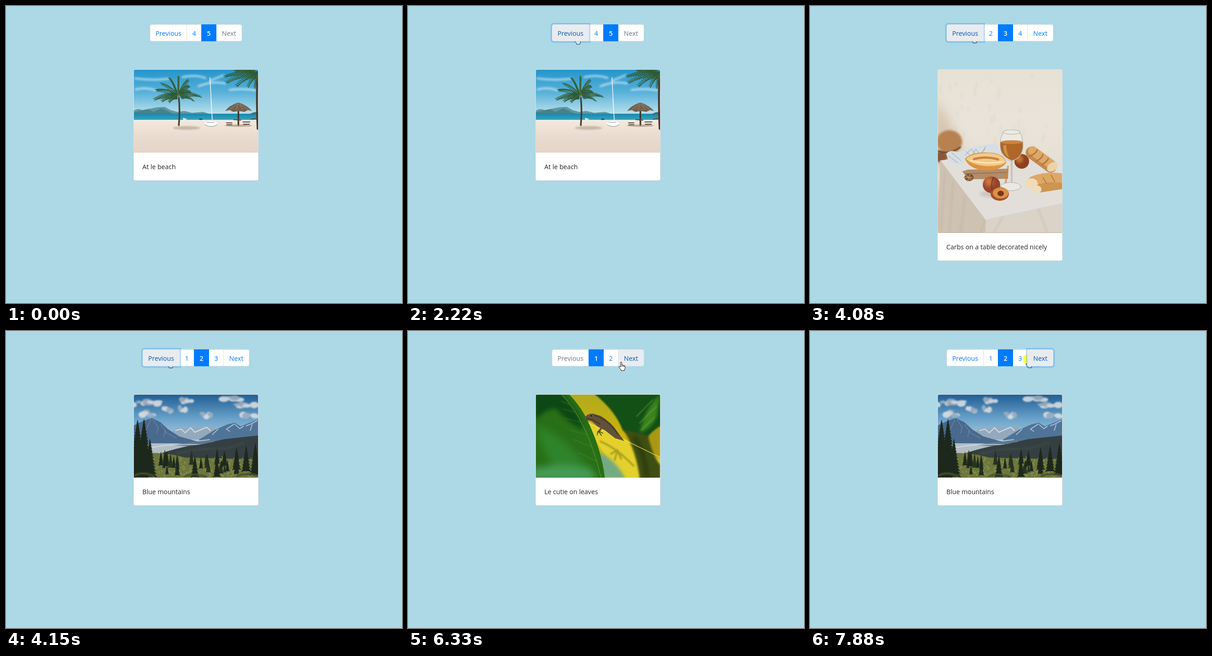
Recreate the animation shown at these times as an HTML page. Size 864x648 px, loop 8 s.

```html
<!DOCTYPE html>
<html lang="en">
<head>
<meta charset="utf-8">
<title>Photo pages</title>
<style>
html, body { margin: 0; width: 100%; height: 100%; overflow: hidden; background: #add8e6; }
body { font: 14.2px "Open Sans", "Noto Sans", sans-serif; color: #212529; }
#pager { position: absolute; top: 40px; display: flex; }
#pager span {
  box-sizing: border-box; width: 33px; height: 37px; margin-left: -1px; position: relative;
  border: 1px solid #dee2e6; background: #fff; color: #007bff; line-height: 37px; text-align: center;
}
#pager span:first-child { width: 81px; margin-left: 0; border-radius: 4px 0 0 4px; }
#pager span:last-child { width: 57px; border-radius: 0 4px 4px 0; }
#pager .hover { background: #e9ecef; color: #0056b3; }
#pager .off { color: #6c757d; }
#pager .active { background: #007bff; border-color: #007bff; color: #fff; font-weight: 600; z-index: 1; }
#pager .focus { z-index: 2; box-shadow: 0 0 0 3px rgba(0, 123, 255, .25); }
#card {
  position: absolute; left: 278px; top: 138px; width: 271px; overflow: hidden;
  border: 1px solid rgba(0, 0, 0, .125); border-radius: 4px; background: #fff;
}
#photo { display: block; }
#caption { position: absolute; left: 297.5px; line-height: 22px; white-space: nowrap; }
#pointer { position: absolute; left: 0; top: 0; }
#glow { mix-blend-mode: multiply; }
</style>
</head>
<body>
<div id="pager"></div>
<div id="card"><svg id="photo" width="271"></svg></div>
<div id="caption"></div>
<svg id="glowLayer" width="864" height="648" style="position:absolute;left:0;top:0;mix-blend-mode:multiply">
  <circle id="glow" r="11.5" fill="#ffff45"/>
</svg>
<svg id="pointer" width="864" height="648" fill="#fff" stroke="#111" stroke-linejoin="round">
  <path id="arrow" d="M0 0V13L3 10.3 5.1 15 7.1 14.1 5.1 9.6H9Z"/>
  <path id="hand" d="M-1.4 11V1.2Q-1.4 -.4 0 -.4T1.4 1.2V6.2Q3.5 5 4 6.8Q6 6 6.4 7.6Q8.6 7.2 8.6 9.5V12.5Q8.6 14.5 7.2 16V18.2H-.2V16.6L-4.8 11.2Q-5.4 9.2 -3.4 9.2ZM1.4 6.2v4M4 6.8v3.4M6.4 7.6v3"/>
</svg>
<script>
const $ = id => document.getElementById(id);

// Drawing helpers
const soft = n => `style="filter:blur(${n}px)"`;
const fill = (color, d, more = '') => `<path fill="${color}" d="${d}" ${more}/>`;
const line = (color, w, d, more = '') =>
  `<path fill="none" stroke="${color}" stroke-width="${w}" stroke-linecap="round" d="${d}" ${more}/>`;
const oval = (color, x, y, rx, ry = rx, more = '') =>
  `<ellipse fill="${color}" cx="${x}" cy="${y}" rx="${rx}" ry="${ry}" ${more}/>`;
const fade = (y, h, ...colors) => {
  const id = 'fade' + y;
  const stops = colors.map((c, i) => `<stop offset="${i / (colors.length - 1)}" stop-color="${c}"/>`).join('');
  return `<linearGradient id="${id}" x2="0" y2="1">${stops}</linearGradient>
    <rect x="270" y="${y}" width="290" height="${h}" fill="url(#${id})"/>`;
};
const each = (list, fn) => list.map(v => fn(...v)).join('');
const random = seed => () => {
  seed = (seed * 16807) % 2147483647;
  return seed / 2147483647;
};

function frond(x, y, ex, ey) {
  const cx = (x + ex) / 2, cy = (y + ey) / 2 - 9, dx = (ex - x) * .12;
  let d = '';
  for (let t = .1; t < 1; t += .07) {
    const u = 1 - t;
    const px = u * u * x + 2 * u * t * cx + t * t * ex;
    const py = u * u * y + 2 * u * t * cy + t * t * ey;
    d += `M${px} ${py}l${dx + 1} ${8 * u + 2}M${px} ${py}l${dx - 2} ${-4 * u - 1}`;
  }
  return line('#2d5836', 1.4, d) + line('#456c3c', 1.5, `M${x} ${y}Q${cx} ${cy} ${ex} ${ey}`);
}

function tree(x, base, h, color = '#1d281c') {
  const n = Math.max(5, Math.round(h / 7));
  let right = '', left = '';
  for (let i = 1; i <= n; i++) {
    const w = h * .19 * i / n + 1, y = base - h + h * i / n;
    right += `L${x + w} ${y}L${x + w * .6} ${y - 1}`;
    left = `L${x - w * .6} ${y - 1}L${x - w} ${y + 1}` + left;
  }
  return fill(color, `M${x} ${base - h - 3}${right}${left}Z`);
}

function camera(x, y, size, top, turn = -8, blur = 0.3) {
  return `<g transform="translate(${x} ${y}) rotate(${turn}) scale(${size})" ${soft(blur)}>`
    + fill('#0b0c0e', 'M-51 -4H51V38Q50 43 45 43H-45Q-51 42 -51 36Z')
    + fill(top, 'M-51 0V-14H-23L-12 -32H14L25 -14H51V0Z')
    + fill('#fff', 'M-11 -30H13L18 -22H-16Z', 'opacity=".25"')
    + fill('#111', 'M-19 -4L-8 -20H10L21 -4Z', 'opacity=".3"')
    + oval('#202326', -37, -15, 10, 6) + oval(top, -37, -18, 9, 4)
    + oval('#202326', 37, -15, 9, 6) + oval('#d6d9db', 37, -18, 7, 3)
    + '<g stroke="#63676b" stroke-width="2">' + oval('#08090a', 0, 26, 26, 24) + '</g>'
    + '<g stroke="#aeb1b4" stroke-width="3">' + oval('#15181b', 0, 30, 17, 15) + '</g>'
    + oval('#34393f', -4, 27, 6, 5) + '</g>';
}

function beach() {
  return fade(139, 98, '#2595cb', '#57b1da', '#bfe2ec')
    + line('#f2fafb', 4, 'M282 158q35 5 72 1M283 182q20 -6 44 2M385 155q28 -6 50 2M420 175q30 -12 58 -6M488 183q30 -4 56 1M445 163l30 -12', 'opacity=".65" ' + soft(2))
    + fill('#5c98a3', 'M278 236V229Q287 222 298 227L330 221 346 220 359 227 373 231 389 229 406 233 430 231 449 237Z')
    + fill('#3e7a7c', 'M278 237V232L310 225 322 231 339 223 360 233 376 237Z', 'opacity=".7"')
    + fade(235, 16, '#1e86ab', '#36abc0')
    + fill('#397180', 'M530 237Q540 230 551 231V237Z')
    + fade(249, 72, '#f4e8dc', '#e9dbcf', '#e5d4c7')
    + line('#f9f5ee', 2, 'M278 249.5H551')
    + oval('#ad9680', 394, 266, 30, 4, 'opacity=".55" ' + soft(1.5))
    + line('#4b3b31', 3.5, 'M377 200Q380 228 377 260')
    + each([[326, 205], [330, 184], [341, 169], [358, 157], [377, 153], [397, 160], [399, 174], [402, 187], [423, 198],
      [408, 207], [342, 209], [357, 211]], (x, y) => frond(376, 194, x, y))
    + line('#eef4f5', 1.6, 'M445 156L450 250M447 203l3 44')
    + oval('#fff', 447, 257, 14, 6) + line('#7d8a8b', 1, 'M434 259q13 8 27 0M438 254h16')
    + line('#43362b', 3.5, 'M507 228V260')
    + oval('#8b7663', 507, 261, 30, 2.5, 'opacity=".5"')
    + fill('#736252', 'M478 229Q487 217 505 211H509Q526 217 537 229L528 227 520 231 508 229 496 231 488 227Z')
    + line('#a28c75', 1, 'M505 213l-16 13M507 213l-5 14M509 213l8 14M511 214l17 12')
    + line('#5d4c3e', 2, 'M481 255h12M482 259h11M517 253l15 0M518 258h13M497 248l15 1M535 247l13 -2')
    + fill('#f3f5f3', 'M386 244l10 3 -9 2Z') + oval('#344f55', 425, 247, 4, 1.5)
    + line('#46352b', 4, 'M549 145Q546 200 549 268')
    + each([[481, 155], [484, 168], [505, 176], [502, 143], [529, 178], [520, 141], [543, 180], [551, 176]],
      (x, y) => frond(549, 146, x, y));
}

function cameras() {
  return fade(139, 340, '#090a0b', '#15171a', '#08090a')
    + fill('#a77f69', 'M278 222L292 232 288 254 278 248ZM398 246l16 10 -12 8ZM480 330l18 12 -15 10ZM430 432l12 -10 4 28 -12 12Z', soft(1.5))
    + each([[370, 160, .65, '#838b90', -5, 1.4], [294, 167, .55, '#8d9497', -12, 1.2], [424, 180, .57, '#9ca2a3', 0, 1],
      [510, 170, .65, '#292c2f', -15, 1], [340, 204, .9, '#a1a6a6', -8, .8], [433, 211, .75, '#989d9f', -4, .6],
      [534, 207, .65, '#a8aaa9', -12, .7], [488, 242, .6, '#222528', -5, .8], [378, 247, .7, '#b5b9b8', -9, .3],
      [291, 269, .7, '#25292c', -5], [515, 282, .8, '#303438', -12], [417, 278, .98, '#bfc3c2', -8, .1],
      [321, 325, .88, '#b9bfc3', 5, .2], [527, 342, .68, '#292d31', -16],
      [435, 330, 1.15, '#c2c6c5', -12, .1], [310, 380, .65, '#292c2e', -10, .6],
      [502, 397, 1.15, '#24282b', -14, .8], [378, 421, 1.25, '#303437', -5, 1]], camera)
    + fill('#bfc4c4', 'M294 426Q303 410 326 409L363 415 361 433 298 438Z', soft(1.5))
    + oval('#e2e4e2', 350, 393, 12, 9, soft(1)) + oval('#d7dad9', 424, 399, 14, 11, soft(1.5))
    + oval('#eceeec', 465, 381, 24, 12, 'transform="rotate(-18 465 381)" ' + soft(1.5))
    + line('#9a9d9c', 7, 'M428 353Q438 378 464 378M510 430q5 15 30 5M304 354q18 -18 40 -5', soft(.8))
    + fill('#d9dcda', 'M440 478Q460 451 488 459L514 449 520 461 551 446V478Z', soft(2))
    + line('#737a7e', 3, 'M460 170l12 -28M486 165l15 -24', 'stroke-dasharray="2 5"');
}

function table() {
  const next = random(9);
  let marks = '';
  for (let i = 0; i < 28; i++) marks += `M${285 + next() * 260} ${145 + next() * 150}v${3 + next() * 18}`;
  return fade(139, 356, '#e7e1d5', '#e9e4da', '#e5ddd0', '#bda48d')
    + fill('#d6c4ae', 'M270 200Q320 265 340 350H270Z', soft(12))
    + line('#bdb09e', 2, marks, 'opacity=".25" ' + soft(2))
    + oval('#b88152', 304, 296, 28, 25, soft(2)) + oval('#8a5836', 285, 329, 16, 12, soft(2))
    + line('#65452f', 3, 'M279 316Q305 326 328 308', soft(1))
    + fill('#e2dfdb', 'M284 337L410 320 551 333V432L383 468Z', soft(.6))
    + fill('#cec2b3', 'M284 336L383 466V494H279Z')
    + fill('#dbd3c8', 'M383 466L551 430V494H383Z')
    + line('#b7a898', 2, 'M294 360L286 490M312 384L304 494M338 415l-9 79M382 468l-10 26M420 460l-18 34M498 444l20 50', 'opacity=".55" ' + soft(2))
    + fill('#d8dee2', 'M297 323Q304 312 322 319L360 306 407 299 416 320 380 334 345 330 330 348 303 340Z', soft(.7))
    + line('#919ca5', 1, 'M340 317l12 11 10 -16 10 15 11 -20M338 326l14 -14 14 17 16 -17M302 327l20 15M309 320l20 17')
    + fill('#b28d69', 'M332 361L344 357 433 355 432 377 346 378Z') + line('#806044', 1, 'M338 366L432 363')
    + oval('#77502e', 347, 374, 10, 8) + line('#bd8d55', 2, 'M339 368l14 12M349 367l-5 15M336 374h18')
    + fill('#dc9440', 'M338 333Q354 317 393 320 421 321 429 341 417 359 383 359 346 356 338 333Z')
    + fill('#f4ca88', 'M340 333Q356 320 390 321 420 322 428 341 412 351 382 349 351 346 340 333Z')
    + line('#c98340', 5, 'M358 334Q385 327 411 335', 'stroke-dasharray="4 3"')
    + line('#fff0c9', 2, 'M350 337Q382 346 421 340')
    + oval('#8c421f', 462, 339, 16) + oval('#cb7937', 457, 334, 8, 8, soft(3))
    + line('#c38a4f', 27, 'M484 320L525 350') + line('#dda968', 20, 'M486 316L526 345')
    + line('#b6763c', 3, 'M481 327q12 -5 15 -13M494 338q12 -5 14 -14M506 346q10 -5 14 -13')
    + oval('#ecd3a7', 529, 351, 13, 9, 'transform="rotate(-35 529 351)"')
    + line('#cd9452', 20, 'M500 397L553 389') + line('#dda866', 21, 'M486 382Q520 369 556 377')
    + oval('#f0dcb8', 483, 388, 14, 12) + oval('#f1ddbc', 497, 400, 8, 8)
    + line('#b97a40', 2, 'M508 374l8 13M526 369l8 14')
    + oval('#edf1ed', 440, 303, 26, 35, 'opacity=".45"')
    + fill('#ae6629', 'M415 297H464Q467 329 440 337 413 327 415 297Z') + oval('#cc8540', 440, 297, 24.5, 4)
    + fill('#d39648', 'M422 304Q421 323 435 332 427 314 428 303Z', soft(1))
    + line('#a7a89f', 1, 'M421 276Q414 292 415 304 417 335 439 338 466 330 465 302 463 283 458 276M439 338V384M441 338V384')
    + '<g stroke="#aaa9a2" stroke-width="1">' + oval('none', 440, 275, 19, 5)
    + oval('#f4f2ed', 438, 394, 22, 9, 'fill-opacity=".45"') + '</g>'
    + line('#d18134', 4, 'M432 350L427 385', 'opacity=".65"')
    + oval('#b5a99c', 398, 410, 28, 7, 'opacity=".5" ' + soft(3))
    + oval('#97432c', 396, 390, 19, 18) + oval('#ce7a40', 390, 383, 9, 11, soft(4))
    + line('#622c22', 1.5, 'M400 374q-7 15 -1 33')
    + oval('#a65127', 414, 410, 20, 15) + oval('#dd9047', 416, 408, 17, 12) + oval('#743719', 416, 409, 7, 6);
}

function lizard() {
  return fade(139, 181, '#b1aa1d', '#ccb30d', '#d9c51b')
    + fill('#e4d12d', 'M387 195L430 217 551 272V320H470Q425 275 387 195Z', soft(1))
    + fill('#a99813', 'M525 214Q543 198 551 180V280L520 261Z', soft(3))
    + fill('#74aa83', 'M416 264Q449 277 475 322H422Z', soft(3))
    + fill('#286f17', 'M270 130H343Q379 163 398 209 424 267 430 325H270Z', soft(.7))
    + fill('#0c4814', 'M270 130H330Q371 170 383 215 341 196 324 169 296 171 278 195Z', soft(5))
    + fill('#2f842b', 'M280 208Q330 220 386 290L405 320H330Q292 261 280 208Z', soft(9))
    + fill('#469b56', 'M270 302Q331 283 399 302L414 326H270Z', soft(8))
    + line('#69a12c', 1.5, 'M336 139Q390 194 421 319', 'opacity=".65"')
    + line('#7caa47', 1.2, 'M353 161l-19 -8M363 177l-25 -7M377 199l-36 -9M389 226l-35 -10M402 253l-43 -17M411 284l-38 -18', 'opacity=".45" ' + soft(.8))
    + fill('#125015', 'M405 130H560V202Q529 218 519 238L491 234 468 216Q453 174 405 136Z', soft(1.5))
    + fill('#38831e', 'M550 139Q516 168 506 222 531 213 543 186Z', soft(3))
    + line('#81a742', 2, 'M499 186L534 150M505 201L543 164M509 216L538 188', 'opacity=".55" ' + soft(1))
    + fill('#3f4f13', 'M470 215L524 228Q532 270 551 293V325H506Q499 263 470 215Z', soft(2))
    + line('#2a3a0d', 9, 'M495 234Q519 273 521 320', soft(4))
    + line('#8d8416', 4, 'M420 241Q456 256 492 294M443 268L457 260 465 279M457 260L451 281', 'opacity=".65" ' + soft(1.5))
    + line('#f0e454', 1.5, 'M395 201Q430 219 475 239L551 276', 'opacity=".8"')
    + fill('#62513a', 'M385 190Q390 180 403 180L420 185Q444 199 457 220L472 240 452 234 430 217 413 208 401 197 388 194Z')
    + line('#3b3122', 1.5, 'M389 191L402 193 419 203M407 184Q438 194 459 227')
    + line('#675234', 4, 'M423 210L416 220') + line('#42501c', 1.7, 'M414 219l-1 8M416 219l6 9M417 219l8 4')
    + oval('#171712', 400, 185, 1.6);
}

function mountains() {
  const next = random(23);
  let trees = '', grass = '', cloud = '';
  for (const [x, y, w] of [[330, 156, 28], [291, 158, 18], [390, 153, 18], [387, 171, 13], [432, 184, 18], [493, 149, 32],
    [524, 162, 28], [525, 184, 24], [299, 181, 25], [352, 173, 13]])
    for (let i = 0; i < 6; i++)
      cloud += oval(i % 2 ? '#e1e3e4' : '#a5b1be', x + (next() - .5) * 1.6 * w, y + next() * 8 - 4, w * .35, 3 + next() * 4);
  for (let i = 0; i < 230; i++)
    grass += `M${278 + next() * 273} ${278 + next() * 42}l${next() * 7 - 3} -${1 + next() * 3}`;
  for (let i = 0; i < 38; i++) {
    const x = 332 + next() * 220;
    trees += tree(x, 288 + next() * 28, 13 + next() * 18, next() < .5 ? '#26331f' : '#1c291e');
  }
  return fade(139, 106, '#205f95', '#6aa2ca', '#b9d2df')
    + `<g opacity=".85" ${soft(1.7)}>${cloud}</g>`
    + fill('#93aabd', 'M357 222L373 211 390 213 409 208 428 211 449 207 466 222 445 237H360Z')
    + line('#e2eaef', 2, 'M370 217l12 -3 9 8 12 -11 9 10 16 -7 10 -4 8 7', 'opacity=".8"')
    + fill('#49698d', 'M270 210L300 196 318 190 337 199 353 214 378 230 421 242 383 249H270Z')
    + line('#a5b3c1', 1, 'M316 193l-9 20 -10 14M321 194l11 16 -3 13M337 204l13 18 22 12M348 216l-4 15', 'opacity=".6"')
    + fill('#507498', 'M421 237L455 216 482 204 499 200 512 208 532 200 551 193V241H421Z')
    + line('#dce6ed', 1.5, 'M498 203l-17 11 7 5M500 204l10 9 8 -5M524 207l10 -4 14 -7M463 214l-13 12M537 204l-4 13', 'opacity=".8"')
    + fade(245, 30, '#aebdca', '#b9bdbd')
    + fill('#5c7892', 'M362 249Q400 242 428 239L466 236 418 253Z')
    + line('#dae3e9', 2, 'M420 240L444 237M320 254Q360 246 424 248', 'opacity=".75"')
    + fill('#343f42', 'M330 270Q382 251 429 247L476 236 551 228V292H330Z')
    + line('#606653', 2, 'M370 268l50 -10 60 -2 40 -12', 'opacity=".5" ' + soft(2))
    + fill('#6d763d', 'M270 268Q340 261 390 276L551 280V325H270Z')
    + line('#9ca25d', 2, grass, 'opacity=".55"')
    + trees
    + each([[287, 319, 123], [301, 317, 123], [314, 319, 81], [294, 320, 78], [338, 294, 28], [348, 296, 29],
      [412, 319, 45], [503, 303, 47], [524, 307, 54], [544, 315, 68], [460, 319, 41]], (x, y, h) => tree(x, y, h))
    + line('#45502e', 4, 'M282 315q14 -9 40 1M390 317q20 -8 46 1M505 316q25 -8 44 0', soft(1));
}

// Page number: picture, its lower edge, caption
const pages = [null,
  [lizard, 319.5, 'Le cutie on leaves'],
  [mountains, 319.5, 'Blue mountains'],
  [table, 494.5, 'Carbs on a table decorated nicely'],
  [cameras, 478.5, "Damn that's a lot of cameras"],
  [beach, 319.5, 'At le beach']];
const last = pages.length - 1;

// Timings in ms
const turns = [[0, 5], [2300, 4], [3220, 3], [4150, 2], [5330, 1], [7180, 2]];
const clicks = [[2150, 2300], [3140, 3220], [4000, 4080], [5160, 5330], [7110, 7180], [7880, 8000]];
const path = [[150, 687, 401], [540, 484, 80], [690, 497, 50], [920, 497, 50], [1080, 480, 81], [1300, 430, 87],
  [1500, 378, 80], [1690, 360, 69], [1760, 363, 67], [1910, 363, 67], [2070, 368, 65], [2760, 368, 65],
  [2910, 356, 63], [5010, 356, 62], [5630, 356, 62], [5870, 361, 71], [6100, 361, 71], [6330, 465, 68],
  [6710, 476, 62], [8000, 476, 62]];

function pointerAt(t) {
  if (t < path[0][0]) return null;
  const i = path.findIndex(p => p[0] > t);
  const [t0, x0, y0] = path[i - 1], [t1, x1, y1] = path[i];
  const k = (t - t0) / (t1 - t0);
  return [x0 + (x1 - x0) * k, y0 + (y1 - y0) * k];
}

let shownPage, shownPager;

function showPage(page) {
  if (page === shownPage) return;
  shownPage = page;
  const [draw, bottom, text] = pages[page], h = bottom - 139;
  $('photo').setAttribute('viewBox', `279 139 271 ${h}`);
  $('photo').setAttribute('height', h);
  $('photo').innerHTML = draw();
  $('card').style.height = h + 60.5 + 'px';
  $('caption').style.top = bottom + 20 + 'px';
  $('caption').textContent = text;
}

// Returns whether the pointer is over a link
function showPager(page, at, focus) {
  const numbers = [page - 1, page, page + 1].filter(n => n >= 1 && n <= last);
  const labels = ['Previous', ...numbers, 'Next'];
  const left = numbers.length === 3 ? 298 : 314;
  let x = left, link = false;
  const html = labels.map(label => {
    const w = label === 'Previous' ? 81 : label === 'Next' ? 56 : 32;
    const off = label === 'Previous' && page === 1 || label === 'Next' && page === last;
    const over = at && !off && at[0] >= x && at[0] < x + w && at[1] >= 40 && at[1] < 77;
    link ||= over;
    x += w;
    const names = [off && 'off', over && 'hover', label === page && 'active', label === focus && 'focus'];
    return `<span class="${names.filter(Boolean).join(' ')}">${label}</span>`;
  }).join('');
  if (html !== shownPager) $('pager').innerHTML = shownPager = html;
  $('pager').style.left = left + 'px';
  return link;
}

function place(id, at, visible) {
  $(id).style.display = visible ? '' : 'none';
  if (at) $(id).setAttribute('transform', `translate(${at})`);
}

function render(now) {
  const t = now % 8000;
  const page = turns.findLast(turn => turn[0] <= t)[1];
  const focus = t >= 7110 ? 'Next' : t >= 2150 && t < 5700 ? 'Previous' : '';
  const at = pointerAt(t);
  showPage(page);
  const link = showPager(page, at, focus);
  place('arrow', at, at && !link);
  place('hand', at, at && link);
  place('glow', at, clicks.some(([a, b]) => t >= a && t < b));
  requestAnimationFrame(render);
}
render(0);
</script>
</body>
</html>
```
